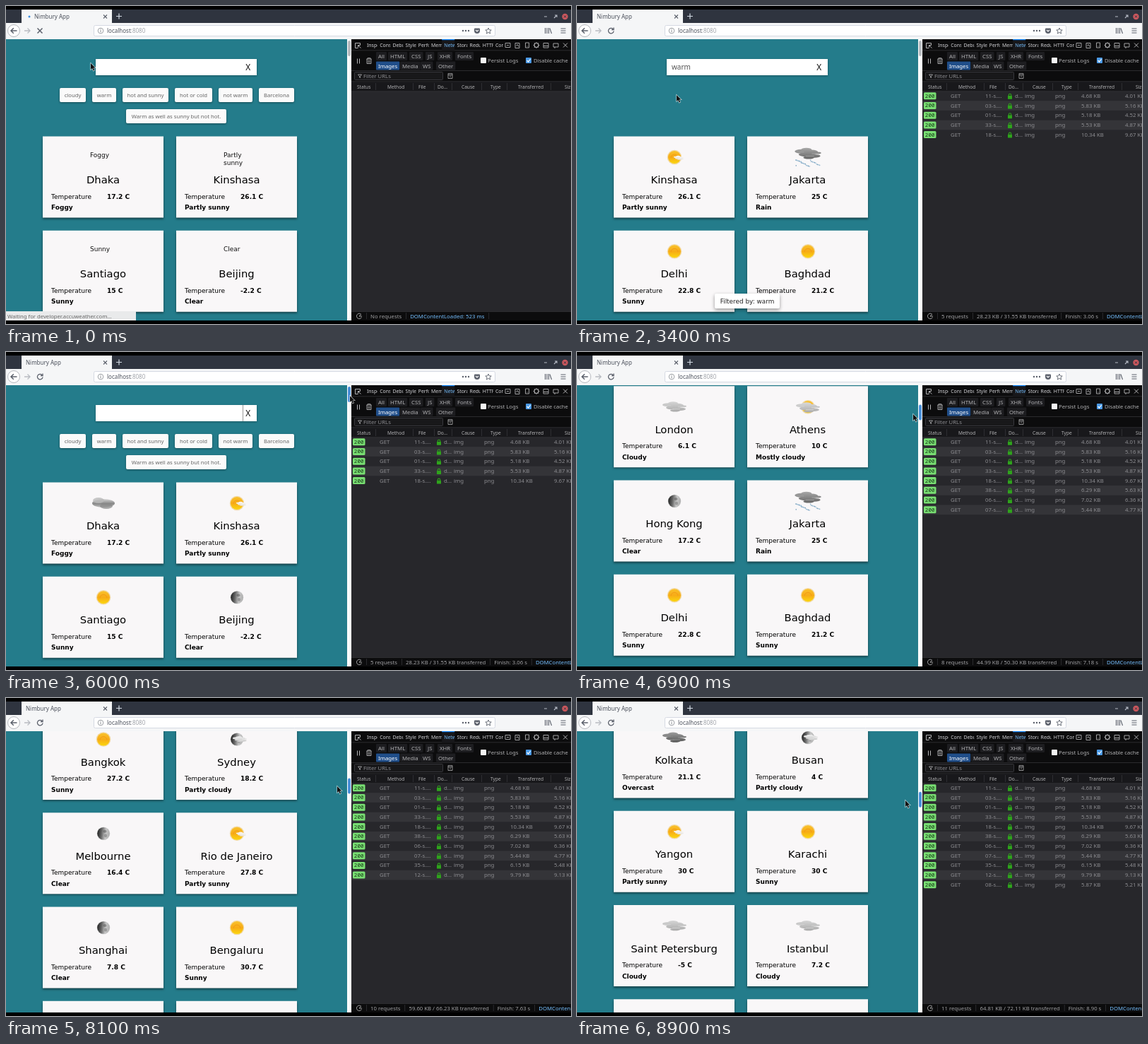
Animation of 800 by 450 pixels, one loop 9 s. Source, as an HTML page with a canvas:

```html
<!DOCTYPE html>
<html lang="en">
<head>
<meta charset="utf-8">
<title>Nimbury App</title>
<style>
html, body { margin: 0; width: 100%; height: 100%; overflow: hidden; background: #000; }
canvas { display: block; }
</style>
</head>
<body>
<canvas id="stage" width="800" height="450"></canvas>
<script>
const g = document.getElementById('stage').getContext('2d');
const LOOP = 9000, LOADED = 600, SETTLED = 1100, FILTER = 2450, CLEAR = 4400, GRAB = 6000;
const UI = '"Noto Sans", sans-serif', BODY = '"DejaVu Sans", sans-serif';

const cities = `Dhaka,17.2,Foggy;Kinshasa,26.1,Partly sunny;Santiago,15,Sunny;Beijing,-2.2,Clear;
Bogota,12.2,Cloudy;Cairo,16.1,Clear;London,6.1,Cloudy;Athens,10,Mostly cloudy;
Hong Kong,17.2,Clear;Jakarta,25,Rain;Delhi,22.8,Sunny;Baghdad,21.2,Sunny;
Seoul,4.5,Cloudy;Mexico City,1.1,Partly cloudy;Lima,20.4,Cloudy;Moscow,-7.8,Cloudy;
Riyadh,22.8,Sunny;Singapore,25,Mostly cloudy;Bangkok,27.2,Sunny;Sydney,18.2,Partly cloudy;
Melbourne,16.4,Clear;Rio de Janeiro,27.8,Partly sunny;Shanghai,7.8,Clear;Bengaluru,30.7,Sunny;
Kolkata,21.1,Overcast;Busan,4,Partly cloudy;Yangon,30,Partly sunny;Karachi,30,Sunny;
Saint Petersburg,-5,Cloudy;Istanbul,7.2,Cloudy;Tokyo,5.6,Clear;Lagos,29,Sunny`
  .split(';').map(s => s.trim().split(','));
const warm = cities.filter(c => c[1] > 20);

const chips = [['cloudy', 76, 116, 37], ['warm', 122, 116, 34], ['hot and sunny', 165, 116, 65],
  ['hot or cold', 239, 116, 53], ['not warm', 301, 116, 48], ['Barcelona', 358, 116, 50],
  ['Warm as well as sunny but not hot.', 170, 146, 142]];

const requests = `11 4.68 4.01,03 5.83 5.16,01 5.18 4.52,33 5.53 4.87,18 10.34 9.67,38 6.29 5.63,
06 7.02 6.36,07 5.44 4.77,35 6.15 5.48,12 9.79 9.13,08 5.87 5.21`.split(',').map(s => s.trim().split(' '));
// time, request count, size, transferred, finish
const totals = [[LOADED, 4, '18.56', '21.21', '1.10'], [2550, 5, '28.23', '31.55', '3.06'],
  [6650, 8, '44.99', '50.30', '7.18'], [7100, 10, '59.60', '66.23', '7.63'], [8400, 11, '64.81', '72.11', '8.90']];

// time, pointer x, pointer y, page scroll
const path = [[0, 120, 81, 0], [2200, 140, 125, 0], [3400, 141, 126, 0], [4200, 343, 86, 0], [4700, 343, 86, 0],
  [5700, 487, 62, 0], [GRAB, 487, 62, 0], [6900, 476, 88, 536], [7400, 472, 107, 908.7],
  [8100, 469, 125, 1354.7], [8900, 465, 145, 1757], [LOOP, 465, 145, 1757]];

function pose(t) {
  const i = path.findIndex(k => k[0] > t), a = path[i - 1], b = path[i];
  const f = (t - a[0]) / (b[0] - a[0]);
  return a.map((v, j) => v + (b[j] - v) * f);
}

function box(x, y, w, h, color) { g.fillStyle = color; g.fillRect(x, y, w, h); }
function round(x, y, w, h, r, color, border) {
  g.beginPath(); g.roundRect(x, y, w, h, r);
  g.fillStyle = color; g.fill();
  if (border) { g.strokeStyle = border; g.lineWidth = 1; g.stroke(); }
}
function oval(x, y, rx, ry, color) {
  g.beginPath(); g.ellipse(x, y, rx, ry, 0, 0, 7); g.fillStyle = color; g.fill();
}
function line(d, color, w = 1) { g.strokeStyle = color; g.lineWidth = w; g.stroke(new Path2D(d)); }
function text(s, x, y, color, size = 7.8, font = UI, align = 'left', weight = '') {
  g.font = `${weight} ${size}px ${font}`;
  g.textAlign = align; g.fillStyle = color; g.fillText(s, x, y);
}
function clipTo(x, y, w, h, draw) {
  g.save(); g.beginPath(); g.rect(x, y, w, h); g.clip(); draw(); g.restore();
}
function shadowed(blur, dy, alpha, draw) {
  g.save(); g.shadowColor = `rgba(0,0,0,${alpha})`; g.shadowBlur = blur; g.shadowOffsetY = dy; draw(); g.restore();
}
function fade(x0, y0, x1, y1, ...colors) {
  const f = g.createLinearGradient(x0, y0, x1, y1);
  colors.forEach((c, i) => f.addColorStop(i / (colors.length - 1), c));
  return f;
}

// Weather icons, centred on 0,0
function sun(r = 9) {
  oval(0, 0, r + 1.3, r + 1.3, '#f3d9a0');
  oval(0, 0, r, r, fade(0, -r, 0, r, '#f9c22c', '#f7ab17', '#fbd60d'));
  g.beginPath(); g.arc(0, 1, r * .55, Math.PI, 0); g.strokeStyle = '#f39a16'; g.lineWidth = 1; g.stroke();
}
function moon() {
  oval(0, 0, 9.3, 9.3, '#d2d2d2');
  oval(0, 0, 8.8, 8.8, fade(-9, 0, 9, 2, '#222', '#666', '#c8c8c8', '#aaa'));
  oval(2, -3, 2.5, 2, 'rgba(70,70,70,.45)'); oval(3, 3, 2, 2.5, 'rgba(90,90,90,.4)');
}
function cloud(x, y, k, dark, light) {
  g.save(); g.translate(x, y); g.scale(k, k);
  const fill = fade(0, -7, 0, 7, light, dark);
  [[-9, -3, 8, 2.6], [-2, -5, 7, 2.6], [5, -2, 8, 3], [-2, 1, 10, 2.8], [8, 3, 8, 2.2], [1, 5, 7, 1.8], [12, -1, 5, 1.3]]
    .forEach(p => oval(...p, fill));
  line('M-15-2H-5M-3 3H8M5 0H15', light, .8);
  g.restore();
}
const icons = {
  Sunny: () => sun(),
  Clear: moon,
  Cloudy: () => cloud(0, 0, 1, '#aaa', '#d3d3d3'),
  Overcast: () => cloud(0, 0, 1, '#555', '#999'),
  Foggy() {
    oval(0, 0, 16, 6, fade(0, -6, 0, 7, '#d5d5d5', '#888', '#ccc'));
    oval(-7, -4, 8, 4, 'rgba(185,185,185,.8)'); oval(4, 4, 9, 4, 'rgba(135,135,135,.7)');
  },
  'Partly sunny'() { sun(); cloud(6, 1, .42, '#e2e0dc', '#faf8f5'); },
  'Mostly cloudy'() { sun(8.5); cloud(0, 1, 1, '#aaa', '#d8d8d8'); },
  'Partly cloudy'() { moon(); cloud(4, 0, .6, '#c4c4c4', '#eee'); },
  Rain() {
    cloud(0, -5, 1.1, '#666', '#a5a5a5');
    for (let i = 0; i < 26; i++)
      oval(-17 + i * 7.3 % 35, 4 + i * 3.7 % 9, .7, .9, i % 3 ? '#8db5d0' : '#6795b5');
  }
};

function card([city, temp, sky], x, y, ready) {
  shadowed(3, 2, .5, () => box(x, y, 171, 115, '#f9f7f8'));
  if (ready) {
    g.save(); g.translate(x + 86, y + 29.5); icons[sky](); g.restore();
  } else sky.split(' ').forEach((w, i) => text(w, x + 67, y + 29 + i * 11, '#111', 9, BODY));
  text(city, x + 85.5, y + 66.7, '#000', 14.8, BODY, 'center');
  text('Temperature', x + 12, y + 88, '#000', 9, BODY);
  text(temp + ' C', x + 91, y + 88, '#000', 9.1, BODY, 'left', 'bold');
  text(sky, x + 12, y + 103.5, '#000', 9, BODY, 'left', 'bold');
}

function page(t, scroll) {
  const filtered = t >= FILTER && t < CLEAR;
  box(0, 47, 483, 398, '#247c8b');
  g.save(); g.translate(0, -scroll);
  shadowed(3, 1, .3, () => box(127, 75, 228, 23, '#fff'));
  if (filtered) text('warm', 134, 90, '#555', 10);
  if (t >= CLEAR) box(335, 75, 1, 23, '#999');
  text('X', 342.8, 91, '#111', 11.8, UI, 'center');
  if (!filtered) for (const [label, x, y, w] of chips) {
    shadowed(3, 1, .4, () => round(x, y, w, 20, 2, '#fafafa'));
    text(label, x + w / 2, y + 13, '#666', 7.7, UI, 'center');
  }
  (filtered ? warm : cities).forEach((c, i) => {
    const y = 184.5 + (i >> 1) * 133.25;
    if (y > scroll - 80 && y < scroll + 450) card(c, i % 2 ? 241 : 52, y, t >= LOADED);
  });
  g.restore();

  const shown = Math.max(0, Math.min(1, (t - FILTER) / 300, (4000 - t) / 300));
  if (shown) {
    g.save(); g.globalAlpha = shown; g.translate(0, 14 * (1 - shown));
    shadowed(5, 2, .4, () => round(195, 407, 92, 21, 2, '#fff'));
    text('Filtered by: warm', 241, 421, '#222', 8.9, BODY, 'center');
    g.restore();
  }
  if (t < SETTLED) {
    box(0, 432, 184, 13, '#e9eaeb');
    text('Waiting for developer.accuweather.com...', 2, 441.5, '#666', 7.7);
  }
}

function browser(t) {
  const busy = t < SETTLED, ink = '#5c616c';
  box(0, 5, 800, 19, '#2f343f');
  box(22, 5, 128, 19, '#f5f6f7');
  if (busy) oval(33 + 4 * Math.sin(t / 180), 15, 1.5, 1.5, '#3b8ee0');
  text('Nimbury App', busy ? 40 : 28, 18, '#4c515c', 8);
  line('M138 12.5l5 5m0-5l-5 5', ink, 1.1);
  line('M156 14.5h8m-4-4v8', '#d3dae3', 1.2);
  line('M762 15h4M776 17l4-4m-3 0h3v3', '#b5bac4', 1.1);
  oval(791.5, 15, 4.2, 4.2, '#cc575d');
  line('M790 13.5l3 3m0-3l-3 3', '#2f343f', 1);

  box(0, 24, 800, 23, '#f5f6f7');
  round(124.5, 27.5, 568, 15, 2, '#fff', '#d5d9e2');
  g.beginPath(); g.arc(11, 35, 8.5, 0, 7); g.fillStyle = '#fff'; g.fill();
  g.strokeStyle = '#b5b8be'; g.lineWidth = 1; g.stroke();
  line('M15.5 35H7m3.8-3.8L7 35l3.8 3.8', ink, 1.5);
  line('M26 35h8m-3.5-3.5L34 35l-3.5 3.5', '#b9bcc2', 1.3);
  if (busy) line('M44.5 31.5l7 7m0-7l-7 7', ink, 1.5);
  else line('M51 32.5a3.8 3.8 0 1 0 1 3M52 30.5v3h-3', ink, 1.3);
  g.beginPath(); g.arc(134, 35, 3.8, 0, 7); g.strokeStyle = '#85898f'; g.lineWidth = .8; g.stroke();
  line('M134 34.3v2.8M134 32.6v1', '#85898f', 1);
  text('localhost', 143, 38, '#4c515c', 8);
  text(':8080', 143 + g.measureText('localhost').width, 38, '#a0a3a9', 8);
  [647, 651, 655].forEach(x => oval(x, 35, 1.2, 1.2, ink));
  round(663, 31.5, 8, 7.5, [1, 1, 4, 4], ink);
  line('M665 34l2 2 2-2', '#fff', 1.1);
  line('M683 31l1.2 2.8 3 .2-2.3 2 .8 3-2.7-1.6-2.7 1.6.8-3-2.3-2 3-.2z', ink, .9);
  line('M763.5 31v8m2.5-8v8m2.5-8v8m1.5-7.5l2.5 7.5', ink, 1.1);
  line('M785.5 32h7m-7 3h7m-7 3h7', ink, 1.1);
}

function scrollbar(t, scroll) {
  box(483, 47, 6, 398, '#fcfcfc');
  round(484, 49 + scroll / 21, 4, 22, 2, t >= GRAB ? '#4a90d9' : '#b8bcc0');
}

function devtools(t) {
  const soft = '#b1b1b3', dim = '#8c8c90', edge = '#38383d';
  box(489, 47, 311, 398, '#27272b');
  box(489, 47, 311, 61, '#0c0c0d');
  box(489, 62.5, 311, .7, edge);

  line('M494.5 52.5h7v3m-3 4h-4v-7m4 3l4 4m-4-4v3m0-3h3', soft);
  'Inspector Console Debugger Style Performance Memory Network Storage Redux HTTP Console'.split(' ')
    .forEach((name, i) => {
      const x = 511 + i * 18.2, on = name === 'Network';
      if (on) { box(x - 3, 47, 18, 16, '#18181b'); box(x - 3, 47, 18, 1.2, '#0a84ff'); }
      clipTo(x, 47, i === 10 ? 11 : 15, 16, () => text(name, x, 58, on ? '#75bfff' : '#d7d7db', 6.9));
    });
  line('M707 52.5h7v6h-7zm2 3h3M721 52.5h6v7h-6zm1.5 4l1.5-2 2 3M735.5 52v7h5v-7zm2 5h1M761 52.5h7v6.5h-7zm0 4h7M775 53h7v5h-7zm2 5v2', soft, .9);
  line('M748 55.5a3 3 0 1 0 6 0a3 3 0 1 0-6 0M751 51.2v1m0 6.6v1m-4.3-4.3h1m6.6 0h1M748 52.5l.7.7m4.6 4.6l.7.7m0-6l-.7.7m-4.6 4.6l-.7.7', soft, 1.1);
  line('M789 52.5l6 6m0-6l-6 6', soft);

  line('M497.5 74.5v7m3-7v7', soft);
  line('M510.5 75h7m-5.5 0v-1.3h4V75m-5 0v6.5h6V75m-4 1.5v4m2-4v4', soft, .9);
  [['All', 527, 74], ['HTML', 544, 74], ['CSS', 574, 74], ['JS', 597, 74], ['XHR', 614, 74], ['Fonts', 639, 74],
    ['Images', 527, 87.5], ['Media', 561, 87.5], ['WS', 590, 87.5], ['Other', 612, 87.5]].forEach(([s, x, y]) => {
    const on = s === 'Images';
    g.font = `7.8px ${UI}`;
    round(x - 3, y - 9, g.measureText(s).width + 6, 12, 1, on ? '#204e8a' : '#1d1d20');
    text(s, x, y, on ? '#fff' : soft);
  });
  round(672, 73, 8, 8, 1, '#f4f4f4');
  text('Persist Logs', 682, 80, soft, 7.7);
  round(736, 73, 8, 8, 1, '#4b9ae6');
  line('M737.7 77l1.8 2 3-4', '#fff', 1.2);
  text('Disable cache', 747, 80, soft, 7.6);

  box(489, 91, 311, .7, edge);
  round(493.5, 93.5, 125, 11, 1, '#18181a', edge);
  line('M498.5 97h5l-2 2.5v2l-1-.5v-1.5z', soft, .8);
  text('Filter URLs', 506, 101.5, dim);
  line('M626 95.5h6v7h-6zm0 2h6m-3 1v2.5', soft, .8);

  box(489, 107, 311, 14, '#18181b');
  box(489, 106.5, 311, .7, edge); box(489, 120.5, 311, .7, edge);
  [['Status', 497], ['Method', 540], ['File', 584], ['Do...', 611], ['Cause', 645], ['Type', 686],
    ['Transferred', 725], ['Size', 791]].forEach(([s, x]) => text(s, x, 117, soft, 6.6));
  [523, 576, 606, 631, 673, 709, 771].forEach(x => box(x, 109, .7, 10, edge));

  const sum = totals.filter(s => s[0] <= t).pop();
  requests.slice(0, sum ? sum[1] : 0).forEach(([file, sent, size], i) => {
    const y = 120.5 + i * 13.7, base = y + 9.3;
    if (i % 2) box(489, y, 311, 13.7, '#343438');
    round(491, y + 1.8, 17.5, 10, 1.5, '#78de72');
    text('200', 499.7, base - .1, '#163516', 7.6, '"Noto Sans Mono", monospace', 'center');
    [['GET', 529], [file + '-s....', 578], ['d...', 620], ['img', 634], ['png', 677], [sent + ' KB', 714], [size + ' KB', 776]]
      .forEach(([s, x]) => text(s, x, base, dim));
    round(610, y + 6.5, 6, 4.8, .5, '#2fa31c');
    line(`M611.3 ${y + 7}v-1.5a1.7 1.7 0 0 1 3.4 0v1.5`, '#2fa31c', 1.1);
  });

  box(489, 432, 311, 13, '#0c0c0d');
  box(489, 432, 311, .7, edge);
  line('M503 436.5a3.7 3.7 0 1 0 .5 4M500 439l2.5-2.5M500 439h4', soft, .9);
  box(510, 434, .7, 9, edge);
  const parts = sum
    ? [sum[1] + ' requests', `${sum[2]} KB / ${sum[3]} KB transferred`, `Finish: ${sum[4]} s`]
    : ['No requests'];
  let x = 516;
  for (const s of [...parts, 'DOMContentLoaded: 523 ms']) {
    text(s, x, 441.8, s[0] === 'D' ? '#75bfff' : '#a0a0a3', 7.75);
    x += g.measureText(s).width + 12;
    box(x - 6, 434, .7, 9, edge);
  }
}

function pointer(x, y) {
  const p = new Path2D('M0 0V9L2.1 7.1 3.7 10.6 5.2 9.9 3.7 6.5H6.5Z');
  g.save(); g.translate(x, y);
  g.strokeStyle = 'rgba(255,255,255,.75)'; g.lineWidth = 1.2; g.stroke(p);
  g.fillStyle = '#111'; g.fill(p);
  g.restore();
}

function draw(now) {
  const t = now % LOOP, [, x, y, scroll] = pose(t);
  box(0, 0, 800, 450, '#000');
  clipTo(0, 47, 483, 398, () => page(t, scroll));
  browser(t);
  scrollbar(t, scroll);
  devtools(t);
  box(0, 445, 800, 5, '#000');
  pointer(x, y);
}

let start;
function tick(now) {
  start ??= now;
  draw(now - start);
  requestAnimationFrame(tick);
}
requestAnimationFrame(tick);
</script>
</body>
</html>
```
